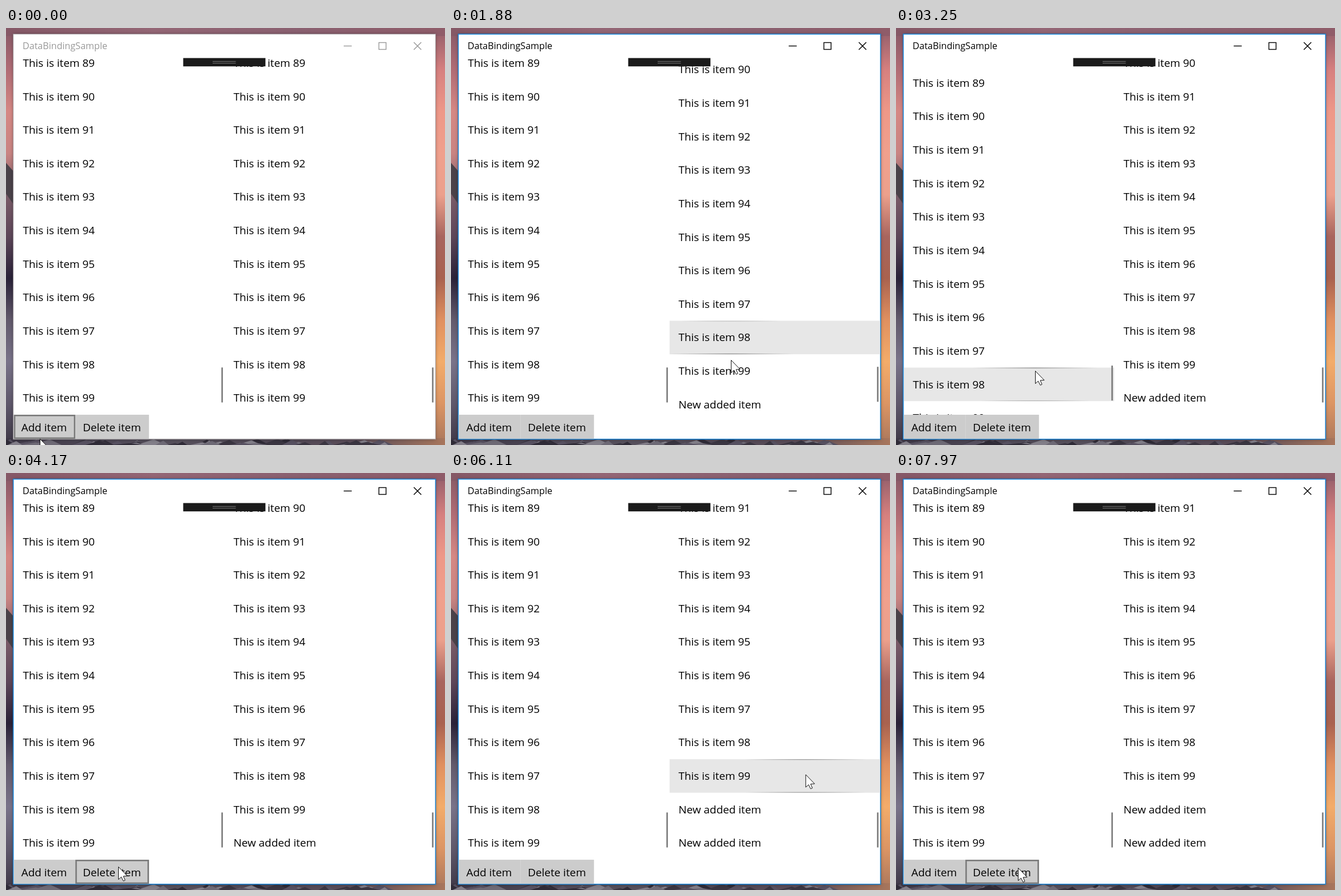
Recreate the animation shown at these times as an HTML page with a canvas. Size 767 by 730 pixels, loop 8000 ms.

```html
<!DOCTYPE html>
<html lang="en">
<head>
<meta charset="utf-8">
<title>DataBindingSample</title>
<style>
  html, body { margin: 0; width: 100%; height: 100%; overflow: hidden; }
  canvas { display: block; }
</style>
</head>
<body>
<canvas id="stage" width="767" height="730"></canvas>
<script>
const W = 767, H = 730, LOOP = 8000, STEP = 77;
const ROW = 58.65, TOP = 53, BOTTOM = 677, GRAY = '#7a7a7a';
const FONT = '"Open Sans", "Noto Sans", sans-serif';
const g = document.getElementById('stage').getContext('2d');

// move: pointer goal; right: rows to scroll to; left: height of a scroll up and back
const ACTIONS = [
  { from: 80, to: 160, move: [59, 705] },
  { from: 640, to: 700, press: 1, add: 1 },
  { from: 860, to: 1100, press: 0 },
  { from: 1320, to: 1650, move: [489, 581] },
  { from: 1800, to: 2020, right: 1 },
  { from: 2250, to: 2480, move: [243, 600] },
  { from: 2790, to: 3330, left: 91 },
  { from: 3870, to: 4177, move: [196, 689] },
  { from: 4254, to: 4560, move: [70, 697] },
  { from: 4720, to: 4720, press: 1 },
  { from: 4790, to: 4790, press: 0, add: 1 },
  { from: 5030, to: 5415, move: [653, 526] },
  { from: 5492, to: 5800, right: 2 },
  { from: 5800, to: 5800, move: [653, 526] },
  { from: 6110, to: 6420, move: [329, 541] },
  { from: 6590, to: 6590, move: [329, 540] },
  { from: 6740, to: 7280, left: 461 },
  { from: 7510, to: 7970, move: [213, 691] }
];

const lerp = (a, b, p) => a + (b - a) * p;
const smooth = p => p * p * (3 - 2 * p);
const easeOut = p => 1 - (1 - p) ** 2.36;

// The screen updates in steps; the first one already shows some progress
function progress({ from, to }, t) {
  const gaps = Math.round((to - from) / STEP);
  const done = Math.floor((t + 10 - from) / ((to - from) / gaps || STEP)) + 1;
  return Math.max(0, Math.min(1, done / (gaps + 1)));
}

function stateAt(t) {
  const s = { x: 59, y: 719, left: 0, right: 0, press: 0, added: 0, hoverShift: 0 };
  for (const a of ACTIONS) {
    const p = progress(a, t);
    if (!p) break;
    if (a.move) {
      s.x = lerp(s.x, a.move[0], smooth(p));
      s.y = lerp(s.y, a.move[1], smooth(p));
      s.hoverShift = Math.round(s.right);
    }
    if (a.left) s.left = a.left * Math.sin(Math.PI * p);
    if (a.right) s.right = lerp(s.right, a.right, easeOut(p));
    if ('press' in a) s.press = lerp(s.press, a.press, p);
    if (a.add && p === 1) s.added++;
  }
  return s;
}

function rect(c, x, y, w, h, color) {
  c.fillStyle = color;
  c.fillRect(x, y, w, h);
}

function shape(c, points, color) {
  c.beginPath();
  points.forEach(([x, y]) => c.lineTo(x, y));
  c.closePath();
  c.fillStyle = color;
  c.fill();
}

function text(s, x, y, color = '#000', size = 18.9) {
  g.font = `${size}px ${FONT}`;
  g.fillStyle = color;
  g.fillText(s, x, y);
}

function line(x1, y1, x2, y2, color) {
  g.beginPath();
  g.moveTo(x1, y1);
  g.lineTo(x2, y2);
  g.strokeStyle = color;
  g.lineWidth = 1.4;
  g.stroke();
}

function makeWallpaper() {
  const cv = document.createElement('canvas');
  cv.width = W;
  cv.height = H;
  const c = cv.getContext('2d');
  let seed = 7;
  const rnd = () => (seed = seed * 16807 % 2147483647) / 2147483647;
  const fade = (x, y, w, h, colors) => {
    const gr = w > h ? c.createLinearGradient(x, 0, x + w, 0) : c.createLinearGradient(0, y, 0, y + h);
    colors.split(' ').forEach((color, i, all) => gr.addColorStop(i / (all.length - 1), color));
    rect(c, x, y, w, h, gr);
  };
  fade(0, 0, 20, H, '#855866 #b06c75 #d58884 #c98482 #7a5c68 #5d4659 #2a2238 #625a6c #797389 #5f586b #3d3746');
  fade(740, 0, 27, H, '#8f5c69 #d6807f #ee9888 #f0a08d #eca08c #a8655e #a9624f #e09060 #f3ac6a #dc9564 #a8765c');
  fade(0, 0, W, 14, '#855866 #946675 #8a6070 #8f5c69');
  fade(0, 718, W, 12, '#3d3746 #4c4654 #56505c #4f4754 #5a4c58 #a8765c');
  shape(c, [[0, 236], [14, 252], [14, 310], [0, 290]], '#4a4249');
  const tones = ['#2f2b37', '#6d6975', '#3a3541', '#827e89', '#565060'];
  for (let i = 0; i < 70; i++) {
    const x = rnd() * 690, w = 8 + rnd() * 24;
    shape(c, [[x - w, H], [x, 719 + rnd() * 8], [x + w * .7, H]], tones[i % 5]);
  }
  return cv;
}
const wallpaper = makeWallpaper();

function drawWindow(active) {
  g.drawImage(wallpaper, 0, 0);
  g.save();
  g.shadowColor = 'rgba(0,0,0,.4)';
  g.shadowBlur = 6;
  rect(g, 13, 11, 737, 708.5, '#fff');
  g.restore();
  g.strokeStyle = active ? '#1b82d2' : '#aaa5a8';
  g.lineWidth = active ? 1.6 : 1;
  g.strokeRect(12.7, 10.7, 737.8, 709.2);

  const ink = active ? '#000' : '#999';
  text('DataBindingSample', 29, 37, ink, 16.1);
  line(590, 31.5, 604, 31.5, ink);
  line(712.5, 25, 725.5, 38, ink);
  line(725.5, 25, 712.5, 38, ink);
  g.strokeRect(651.5, 25.5, 12.5, 12);
}

function drawList(x, width, count, shift, hover, px, py) {
  g.save();
  g.beginPath();
  g.rect(x, TOP, width, BOTTOM - TOP);
  g.clip();
  for (let i = 75; i < count; i++) {
    const y = BOTTOM - ROW * (100 - i) + shift;
    if (i === hover) {
      rect(g, x, y, width, ROW, '#e7e7e7');
      const glow = g.createRadialGradient(px, py, 0, px, py, 110);
      glow.addColorStop(0, '#808080');
      glow.addColorStop(1, '#80808000');
      rect(g, x, y, width, 1.2, glow);
      rect(g, x, y + ROW - 1.2, width, 1.2, glow);
    }
    text(i < 100 ? `This is item ${i}` : 'New added item', x + 15.8, y + 36);
  }
  g.restore();
}

function drawThumb(x, up) {
  rect(g, x, 594.3 - up, 2.6, 61.2, GRAY);
}

function drawButton(label, x, w, hover, press) {
  const v = Math.round(lerp(204, 153, press));
  rect(g, x, BOTTOM, w, 42.3, `rgb(${v},${v},${v})`);
  if (hover) {
    g.strokeStyle = GRAY;
    g.lineWidth = 2.6;
    g.strokeRect(x + 1.3, BOTTOM + 1.3, w - 2.6, 39.7);
  }
  text(label, x + 13, 705.7);
}

function drawPointer(x, y) {
  g.save();
  g.translate(x + .5, y + .5);
  shape(g, [[0, 0], [0, 22], [5, 17.6], [8.6, 24.8], [11.6, 23.4], [8.5, 16.4], [15.5, 16]], '#fff');
  g.strokeStyle = '#111';
  g.lineWidth = 1;
  g.stroke();
  g.restore();
}

function draw(t) {
  const { x, y, left, right, press, added, hoverShift } = stateAt(t);
  const onLists = y < BOTTOM, onLeft = x < 381.5;
  const row = 100 - Math.ceil((BOTTOM - y) / ROW);

  drawWindow(t >= 630);
  drawList(13.7, 367.8, 100, left, onLists && onLeft && left < 200 ? row : -1, x, y);
  drawList(381.7, 368, 100 + added, -right * ROW, onLists && !onLeft ? row + hoverShift : -1, x, y);

  // The left thumb trails a little on fast scrolls
  drawThumb(376.3, .1 * left / (1 + left / 770));
  drawThumb(744.3, 6 * (added - right));

  drawButton('Add item', 13.7, 107.5, !onLists && x < 121, press);
  drawButton('Delete item', 121.2, 128.6, !onLists && x >= 121 && x < 250, 0);

  rect(g, 309.6, 52.6, 143.7, 14.6, '#1b1b1b');
  rect(g, 361, 58, 40.5, 1, '#777');
  rect(g, 361, 61, 40.5, 1, '#777');
  drawPointer(x, y);
}

const start = performance.now();
function tick() {
  draw((performance.now() - start) % LOOP);
  requestAnimationFrame(tick);
}
tick();
</script>
</body>
</html>
```
